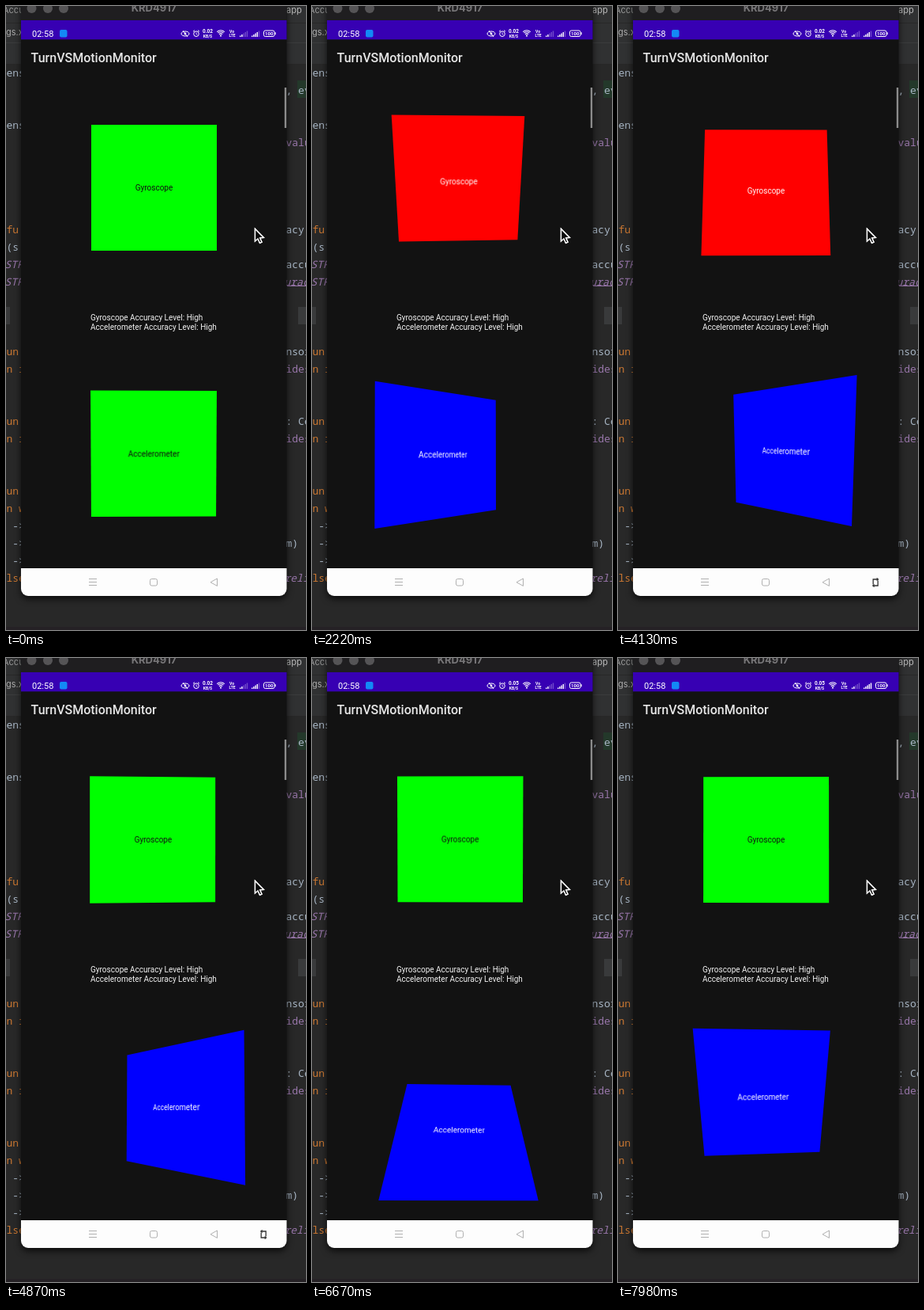
Write an HTML page with a canvas that moves like this. It is 380 by 788 pixels and loops after 8 s.

```html
<!DOCTYPE html>
<html lang="en">
<head>
<meta charset="utf-8">
<title>Sensor tiles</title>
<style>
  html, body { margin: 0; width: 100%; height: 100%; overflow: hidden; background: #282828; }
  canvas { position: absolute; left: 0; top: 0; width: 380px; height: 788px; }
  .tile {
    position: absolute; left: 108px; width: 159px; height: 158.5px;
    font: 10px/160px Roboto, sans-serif; text-align: center;
  }
  #gyro { top: 150px; }
  #accel { top: 487px; }
</style>
</head>
<body>
<canvas id="scene"></canvas>
<div class="tile" id="gyro">Gyroscope</div>
<div class="tile" id="accel">Accelerometer</div>
<script>
const LOOP = 8000, G = 9.8, STEP = 3.11, DEPTH = 179;
const canvas = document.getElementById('scene');
const ctx = canvas.getContext('2d');
const dpr = window.devicePixelRatio || 1;
canvas.width = 380 * dpr;
canvas.height = 788 * dpr;

// Each hand movement is one S-curve: centre and softness in seconds, turn in radians
const roll = {
  rest: .01,
  turns: [[2.21, .275, 1.36], [3.816, .24, -2.4], [5.38, .15, .69],
    [6.1, .3, .37], [7.22, .32, .44], [7.65, .15, -.36]]
};
const pitch = {
  rest: -.025,
  turns: [[2.23, .08, .08], [3.2, .4, -.2], [4.75, .35, .25],
    [5.837, .4, 1.3], [7.23, .243, -1.81]]
};

function sample({ rest, turns }, t) {
  let angle = rest, rate = 0;
  for (const [centre, soft, turn] of turns) {
    const s = Math.tanh((t - centre) / soft);
    angle += turn * (1 + s) / 2;
    rate += turn * (1 - s * s) / (2 * soft);
  }
  return { angle, rate };
}

function pose(id, sides, up, active) {
  const still = Math.abs(sides) < 1 && Math.abs(up) < 1;
  const style = document.getElementById(id).style;
  style.background = still ? '#0f0' : active;
  style.color = still ? '#111' : '#fff';
  style.transform = `translate(${-sides * STEP}px, ${up * STEP}px) perspective(${DEPTH}px) ` +
    `rotateX(${up * 3}deg) rotateY(${sides * 3}deg)`;
}

function box(x, y, w, h, color) {
  ctx.fillStyle = color;
  ctx.fillRect(x, y, w, h);
}

function text(str, x, y, font, color, align = 'left') {
  ctx.font = font;
  ctx.fillStyle = color;
  ctx.textAlign = align;
  ctx.fillText(str, x, y);
}

function line(points, color, width = 1, close = false) {
  ctx.beginPath();
  points.forEach(([x, y]) => ctx.lineTo(x, y));
  if (close) ctx.closePath();
  ctx.strokeStyle = color;
  ctx.lineWidth = width;
  ctx.stroke();
}

function arc(x, y, r, from, to, color, width) {
  ctx.beginPath();
  ctx.arc(x, y, r, from, to);
  ctx.strokeStyle = color;
  ctx.lineWidth = width;
  ctx.stroke();
}

function dot(x, y, r, color) {
  ctx.beginPath();
  ctx.arc(x, y, r, 0, 7);
  ctx.fillStyle = color;
  ctx.fill();
}

function rounded(x, y, w, h, r) {
  ctx.beginPath();
  ctx.roundRect(x, y, w, h, r);
}

// Code rows on both sides of the phone, 22px apart
const leftCode = 'ens|||ens||||||fu|(s|STR|STR||||un|n i|||un|n i|||un|n w| ->| ->| ->|lse';
const rightCode = '|, ev|||value|||||acy:||accu|urac||||nsor|ides|||: Co|ides||||||m)||reli';

function codeColumn(rows, x) {
  rows.split('|').forEach((str, i) => {
    const italic = /^(STR|urac|reli)/.test(str);
    const color = /^(fu|un|n |lse)/.test(str) ? '#cc7832'
      : italic || /^(value|ides)/.test(str) ? '#9876aa' : '#a9b7c6';
    const font = (italic ? 'italic ' : '') + '13px "Noto Sans Mono", monospace';
    text(str, italic ? x - 2 : x, 88.5 + i * 22, font, color);
  });
}

function editor() {
  box(0, 0, 380, 788, '#282828');
  box(0, 0, 380, 73, '#303132');
  box(0, 21, 380, 1, '#282828');
  box(0, 46, 380, 1, '#3b3c3d');
  text('Accu', -4, 9, '11px Inter, sans-serif', '#999');
  text('gs.x', 0, 37, '11px Inter, sans-serif', '#aaa');
  text('app', 355, 9, '11px Inter, sans-serif', '#bbb');
  box(369, 94, 11, 22, '#23382a');
  box(0, 380, 5, 22, '#393a3b');
  box(370, 380, 10, 22, '#393a3b');
  codeColumn(leftCode, 0.5);
  codeColumn(rightCode, 354.5);
  box(356, 353, 24, 1, '#9876aa');
  box(0, 784, 380, 4, '#252125');
}

function bars(x, lit) {
  for (let i = 0; i < 5; i++)
    box(x + i * 2.2, 37.5 - i * 1.5, 1.4, 1.5 + i * 1.5, i < lit ? '#fff' : 'rgba(255,255,255,.3)');
}

function statusBar(ms) {
  const tiny = 'bold 5px Roboto, sans-serif';
  box(19, 18, 336.5, 24.3, '#3700b3');
  text('02:58', 33, 39, '11px Roboto, sans-serif', '#fff');
  rounded(68, 30, 9.5, 9.5, 2);
  ctx.fillStyle = '#1389f5';
  ctx.fill();
  // eye
  ctx.beginPath();
  ctx.ellipse(227, 35, 5, 3, 0, 0, 7);
  ctx.strokeStyle = '#fff';
  ctx.lineWidth = 1;
  ctx.stroke();
  dot(227, 35, 1.4, '#fff');
  line([[224, 31], [230, 39]], '#fff', .9);
  // alarm
  arc(241, 35.2, 3.3, 0, 7, '#fff', 1);
  line([[241, 33.5], [241, 35.5], [242.4, 36]], '#fff', .8);
  line([[237, 32.3], [239, 30.6]], '#fff');
  line([[243, 30.6], [245, 32.3]], '#fff');
  text(ms < 4930 ? '0.02' : '0.05', 255.5, 34, 'bold 6.5px Roboto, sans-serif', '#fff', 'center');
  text('KB/S', 255.5, 39.5, tiny, '#fff', 'center');
  // wireless
  for (const r of [3, 5.2, 7.2]) arc(272, 38, r, -2.3, -.84, '#fff', 1.1);
  dot(272, 37.6, 1.1, '#fff');
  text('Vo', 286, 34, tiny, '#fff', 'center');
  text('LTE', 286.5, 39, tiny, '#fff', 'center');
  bars(296, 2);
  bars(311, ms < 6900 ? 4 : 5);
  // battery
  rounded(326.5, 31, 13.5, 7.5, 2);
  ctx.strokeStyle = '#fff';
  ctx.lineWidth = 1;
  ctx.stroke();
  box(340.5, 33.2, 1.2, 3, '#fff');
  text('100', 333.2, 37, 'bold 6px Roboto, sans-serif', '#fff', 'center');
}

function rotateIcon(mirror) {
  ctx.save();
  ctx.translate(326.2, 728);
  if (mirror) ctx.scale(-1, 1);
  for (let i = 0; i < 2; i++) {
    line([[-3, 2.5], [-3, -4], [2, -4]], '#333', 1.3);
    ctx.beginPath();
    ctx.moveTo(1.5, -6.2);
    ctx.lineTo(4.4, -4);
    ctx.lineTo(1.5, -1.8);
    ctx.fillStyle = '#333';
    ctx.fill();
    ctx.rotate(Math.PI);
  }
  ctx.restore();
}

function navBar(ms) {
  rounded(19, 710, 336.5, 35, [0, 0, 9, 9]);
  ctx.fillStyle = '#fdfdfd';
  ctx.fill();
  for (const y of [723.5, 727.5, 731.5]) line([[105, y], [115, y]], '#b0b0b0');
  rounded(182.5, 723.5, 9, 8.5, 2);
  ctx.stroke();
  line([[259, 727.7], [267.5, 723], [267.5, 732.4]], '#b0b0b0', 1, true);
  if (ms >= 2900 && ms < 6350) rotateIcon(ms >= 4560);
}

function phone(ms) {
  const small = '10px Roboto, sans-serif';
  ctx.save();
  ctx.shadowColor = 'rgba(0,0,0,.7)';
  ctx.shadowBlur = 8 * dpr;
  ctx.shadowOffsetY = 4 * dpr;
  rounded(19, -20, 336.5, 765, 9);
  ctx.fillStyle = '#121212';
  ctx.fill();
  ctx.restore();
  box(19, 0, 336.5, 18, '#1f1e20');
  for (const x of [32.5, 53, 73]) dot(x, 3, 6, '#555456');
  text('KRD4917', 187.5, 7, 'bold 13px Inter, sans-serif', '#777678', 'center');
  statusBar(ms);
  text('TurnVSMotionMonitor', 31.5, 71, '500 16px Roboto, sans-serif', '#e6e6e6');
  text('Gyroscope Accuracy Level: High', 107, 397, small, '#f2f2f2');
  text('Accelerometer Accuracy Level: High', 107, 408.7, small, '#f2f2f2');
  box(352.8, 103, 2.4, 51, '#8b8b8b');
  navBar(ms);
}

function pointer() {
  line([[315.5, 281.5], [315.5, 297], [319, 293.8], [321.5, 299.3],
    [324, 298.2], [321.6, 292.8], [326.3, 292.5]], '#fff', 1.4, true);
  ctx.fillStyle = '#0a0a0a';
  ctx.fill();
  ctx.stroke();
}

function frame(now) {
  const ms = now % LOOP;
  const r = sample(roll, ms / 1000), p = sample(pitch, ms / 1000);
  ctx.setTransform(dpr, 0, 0, dpr, 0, 0);
  editor();
  phone(ms);
  pointer();
  pose('gyro', p.rate, -r.rate, '#f00');
  pose('accel', G * Math.sin(r.angle), G * Math.sin(p.angle), '#00f');
  requestAnimationFrame(frame);
}
requestAnimationFrame(frame);
</script>
</body>
</html>
```
